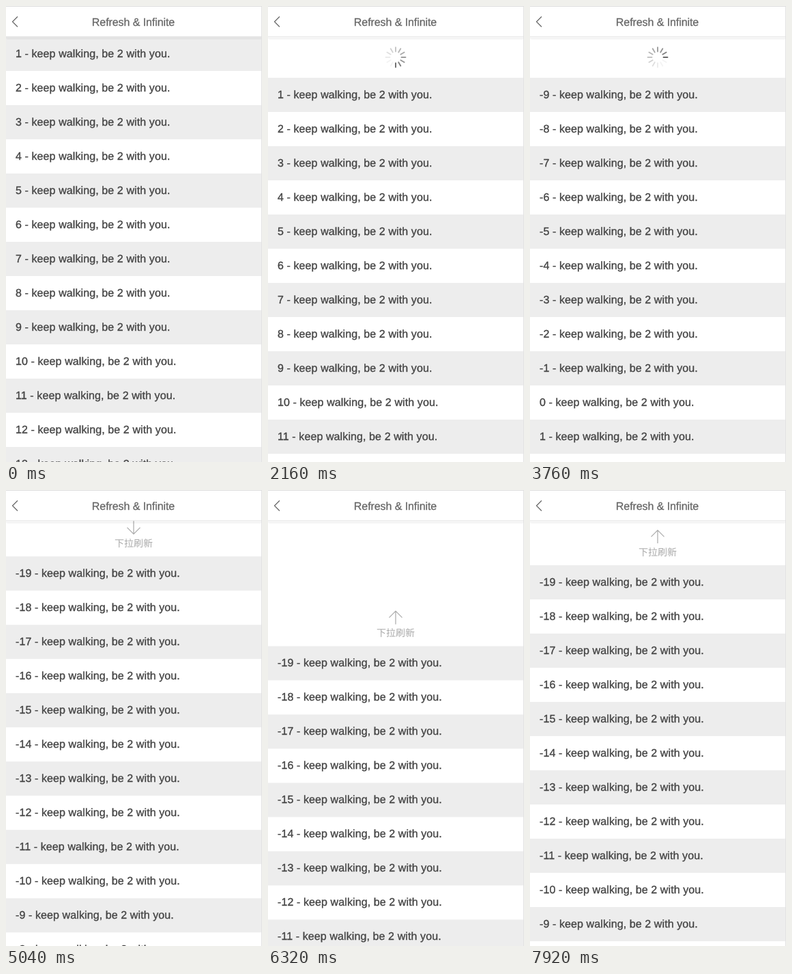
An HTML page that plays this animation: 375x667 px, repeating every 8000 ms.

```html
<!DOCTYPE html>
<html lang="en">
<head>
<meta charset="utf-8">
<title>Refresh &amp; Infinite</title>
<style>
  html, body { margin: 0; width: 100%; height: 100%; overflow: hidden; background: #fff; }
  #stage {
    position: relative; width: 375px; height: 667px; overflow: hidden; background: #fff;
    font: 16px "Liberation Sans", Arial, sans-serif; text-rendering: geometricPrecision;
  }
  #scroll { position: absolute; left: 0; top: 45px; width: 375px; }
  .row {
    height: 50px; line-height: 52px; padding-left: 14px; white-space: pre;
    color: #444; letter-spacing: .1px; -webkit-text-stroke: .35px #444;
  }
  .odd { background: #ededed; }
  #layer { position: absolute; left: 0; top: -60px; width: 374px; height: 60px; }
  #layer svg { position: absolute; overflow: visible; fill: none; }
  #arrow { left: 177px; top: 8px; stroke: #aaa; stroke-width: 1.2; }
  #hint {
    position: absolute; left: 0; top: 31px; width: 374px; line-height: 20px; text-align: center;
    font-size: 14px; font-weight: 300; font-family: "Noto Sans CJK SC", "Noto Sans CJK", sans-serif; color: #aaa;
  }
  #spinner { left: 171px; top: 14px; stroke: #6b6b6b; stroke-width: 1.9; stroke-linecap: round; }
  #shade {
    position: absolute; left: 0; top: 45px; width: 375px; height: 4px;
    background: rgba(0, 0, 0, .04); border-radius: 0 0 3px 3px;
  }
  #header {
    position: absolute; left: 0; top: 0; width: 375px; height: 45px; box-sizing: border-box;
    background: #fff; border-top: 1px solid #ddd; border-bottom: 1px solid #ececec;
  }
  #title {
    position: absolute; left: 0; top: 0; width: 373px; line-height: 48px; text-align: center;
    color: #666; letter-spacing: -.08px; -webkit-text-stroke: .3px #666;
  }
  #header svg { position: absolute; left: 8px; top: 13px; fill: none; stroke: #666; stroke-width: 1.2; }
  #edge { position: absolute; left: 374px; top: 0; width: 1px; height: 667px; background: #e2e2e2; }
</style>
</head>
<body>
<div id="stage">
  <div id="scroll">
    <div id="layer">
      <div id="pull">
        <svg id="arrow" width="20" height="20"><path d="M10 0V19M.5 9.7L10 19.2L19.5 9.7"/></svg>
        <div id="hint">下拉刷新</div>
      </div>
      <svg id="spinner" width="32" height="32" viewBox="-16 -16 32 32"></svg>
    </div>
    <div id="list"></div>
  </div>
  <div id="shade"></div>
  <div id="header">
    <svg width="12" height="20"><path d="M9 1.5L1.5 9L9 16.5"/></svg>
    <div id="title">Refresh &amp; Infinite</div>
  </div>
  <div id="edge"></div>
</div>
<script>
const LOOP = 8000, STEP = 80, REST = 60, SETTLE = 235, FLIP = 150;

// Each drag: start and end, depth, easing power, then release and reload times.
const drags = [
  { from: 160, to: 800, depth: 80, pow: 1.16, release: 965, done: 2405, first: 1, spin: 180, spinAt: 2160 },
  { from: 2880, to: 3440, depth: 120, pow: 1.6, release: 3525, done: 4965, first: -9, spin: 90, spinAt: 3760 },
  { from: 5760, to: 6400, depth: 185, pow: 2.28, release: Infinity, done: Infinity, first: -19, liftFrom: 7040, liftTo: 7920 }
];
const fade = [1, .85, .7, .65, .55, .45, .35, .25, .15, .1, 0, 1];

const $ = id => document.getElementById(id);
const scroll = $('scroll'), list = $('list'), pull = $('pull'), arrow = $('arrow'), spinner = $('spinner');
const progress = (t, a, b) => Math.min(1, Math.max(0, (t - a) / (b - a)));
const easeInOut = p => p < .5 ? 4 * p ** 3 : 1 - 4 * (1 - p) ** 3;
const settle = (t, start) => easeInOut(progress(t, start, start + SETTLE));

const rows = Array.from({ length: 14 }, () => list.appendChild(document.createElement('div')));
const spokes = Array.from({ length: 12 }, (_, i) => {
  const line = document.createElementNS('http://www.w3.org/2000/svg', 'path');
  line.setAttribute('d', 'M0 -8.5V-14.5');
  line.setAttribute('transform', `rotate(${i * 30})`);
  return spinner.appendChild(line);
});

// Moment at which the drag passes the refresh threshold.
for (const d of drags) {
  d.armed = d.from + (d.to - d.from) * (1 - (1 - REST / d.depth) ** (1 / d.pow));
}

function offset(d, t) {
  if (t >= d.done) return REST * (1 - settle(t, d.done));
  if (t >= d.release) return d.depth + (REST - d.depth) * settle(t, d.release);
  const y = d.depth * (1 - (1 - progress(t, d.from, d.to)) ** d.pow);
  return d.liftTo ? y - 120 * progress(t, d.liftFrom, d.liftTo) ** 1.5 : y;
}

let shown = null;
function fill(first) {
  if (first === shown) return;
  shown = first;
  rows.forEach((row, i) => {
    const n = first + i;
    row.className = n % 2 ? 'row odd' : 'row';
    row.textContent = `${n} - keep walking, be 2 with you.`;
  });
}

function spin(angle) {
  spokes.forEach((spoke, i) => {
    const age = (((angle - i * 30) / 360) % 1 + 1) % 1 * 11;
    const k = Math.floor(age);
    spoke.style.strokeOpacity = fade[k] + (fade[k + 1] - fade[k]) * (age - k);
  });
}

function draw(t) {
  const d = drags.filter(x => t >= x.from).pop() || drags[0];
  const loading = t >= d.release && t < d.done;
  fill(t >= d.done ? d.first - 10 : d.first);
  scroll.style.transform = `translateY(${offset(d, t).toFixed(2)}px)`;
  pull.style.visibility = loading ? 'hidden' : 'visible';
  spinner.style.visibility = loading ? 'visible' : 'hidden';
  if (loading) spin(d.spin + (t - d.spinAt) * .36);
  const turn = t >= d.done ? 0 : 180 * progress(t, d.armed, d.armed + FLIP);
  arrow.style.transform = `rotate(${turn}deg)`;
}

const begin = performance.now();
function tick() {
  const t = (performance.now() - begin) % LOOP;
  draw(Math.floor(t / STEP) * STEP);
  requestAnimationFrame(tick);
}
tick();
</script>
</body>
</html>
```
